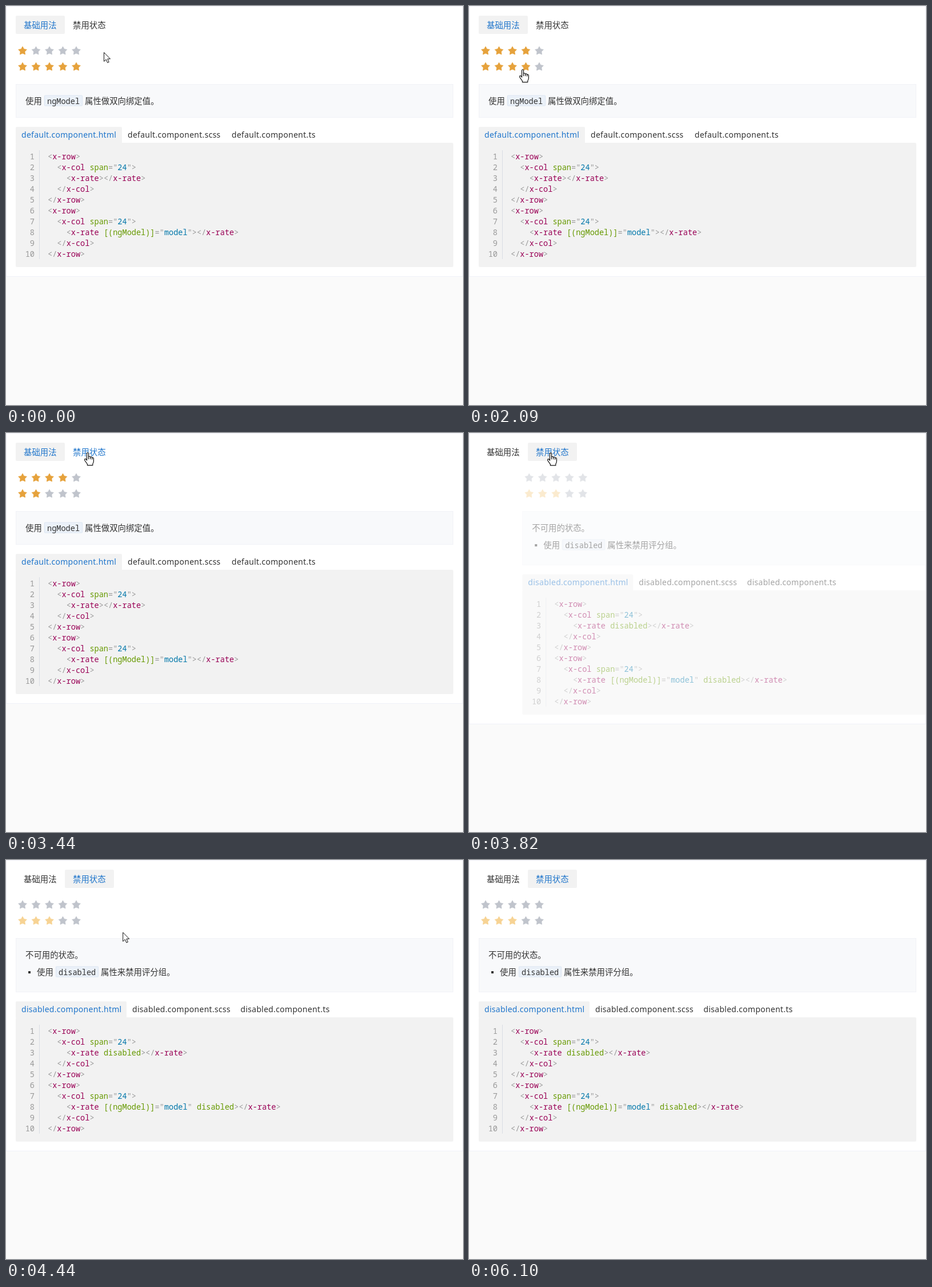
Animation, 800 px wide and 700 px high, one loop 6630 ms. Source, as an HTML page:

```html
<!DOCTYPE html>
<html lang="zh">
<head>
<meta charset="utf-8">
<title>Rate</title>
<style>
html, body { margin: 0; width: 100%; height: 100%; overflow: hidden; background: #fafafa; }
svg { display: block; width: 800px; height: 700px; }
text { white-space: pre; fill: #333; }
.ui { font: 14.4px "Noto Sans CJK SC", "Noto Sans CJK", "Noto Sans", sans-serif; }
.file { font: 14px "Noto Sans", sans-serif; letter-spacing: .28px; }
.code { font: 13.6px "Noto Sans Mono", monospace; }
.on { fill: #1f75cb; }
.num, .punct { fill: #999; }
.tag { fill: #905; }
.attr { fill: #690; }
.str { fill: #07a; }
</style>
</head>
<body>
<svg id="stage" viewBox="0 0 800 700"></svg>
<script>
const LOOP = 6630, SWITCH = 3560;
const OFF = '#c0c4cc', ON = '#e6a23c', DIM = '#f7d394';
const stage = document.getElementById('stage');
const esc = s => s.replace(/</g, '&lt;').replace(/>/g, '&gt;');
const rect = (x, y, w, h, fill, more = '') =>
  `<rect x="${x}" y="${y}" width="${w}" height="${h}" fill="${fill}" ${more}/>`;
const text = (x, y, cls, s, more = '') =>
  `<text x="${x}" y="${y}" class="${cls}" ${more}>${s}</text>`;

function star(cx, cy) {
  const pts = [];
  for (let i = 0; i < 10; i++) {
    const r = i % 2 ? 4.1 : 7.7, a = (i * 36 - 90) * Math.PI / 180;
    pts.push((cx + r * Math.cos(a)).toFixed(2) + ',' + (cy + r * Math.sin(a)).toFixed(2));
  }
  return `<polygon class="star" points="${pts.join(' ')}" stroke-linejoin="round" stroke-width=".8"/>`;
}

function stars() {
  let out = '';
  for (const y of [78.8, 106.8])
    for (let i = 0; i < 5; i++) out += star(29 + 23.5 * i, y);
  return out;
}

// Colours one line of markup.
function paint(line) {
  const span = (cls, s) => `<tspan class="${cls}">${esc(s)}</tspan>`;
  return line.replace(/(<\/?)([\w-]+)|(=")(\w+)(")|([\w[\]()]+)|(>+)/g,
    (m, open, tag, eq, val, end, attr) =>
      open ? span('punct', open) + span('tag', tag) :
      eq ? span('punct', eq) + span('str', val) + span('punct', end) :
      span(attr ? 'attr' : 'punct', m));
}

function codeBlock(y, name, tabs, first, second) {
  const row = inner => ['<x-row>', '  <x-col span="24">',
    `    <x-rate${inner}></x-rate>`, '  </x-col>', '</x-row>'];
  let out = rect(17, y, tabs[0] - 17, 30, '#f2f2f2', 'rx="2"') +
    rect(17, y + 28, 766, 218, '#f2f2f2', 'rx="2"') +
    rect(58, y + 41, 1, 191, '#d9dde3');
  ['html', 'scss', 'ts'].forEach((ext, i) => {
    const x = i ? tabs[i] : 27;
    out += text(x, y + 19, i ? 'file' : 'file on', `${name}.component.${ext}`);
  });
  [...row(first), ...row(second)].forEach((line, i) => {
    const by = y + 56.5 + 19 * i;
    out += text(50, by, 'code num', i + 1, 'text-anchor="end"') + text(73, by, 'code', paint(line));
  });
  return out;
}

const panel = h => rect(17.5, 137.5, 765, h, '#f8f9fb', 'stroke="#f1f2f7"');
const chip = (x, y, w, s) =>
  rect(x + .5, y - 14.5, w, 18, '#ebf1f9', 'stroke="#dbe5f1" rx="1"') + text(x + 5, y, 'code', s);

const basic = stars() + panel(58) +
  text(34, 171.5, 'ui', '使用') + chip(67, 171.5, 66, 'ngModel') +
  text(138, 171.5, 'ui', '属性做双向绑定值。') +
  codeBlock(212, 'default', [203, 213, 395], '', ' [(ngModel)]="model"');

const disabled = stars() + panel(94) +
  text(34, 171.5, 'ui', '不可用的状态。') + rect(39, 195, 4, 4, '#333') +
  text(54, 201.5, 'ui', '使用') + chip(87, 201.5, 74, 'disabled') +
  text(166, 201.5, 'ui', '属性来禁用评分组。') +
  codeBlock(248, 'disabled', [211, 221, 410.5], ' disabled', ' [(ngModel)]="model" disabled');

const cursors = `<g id="cursor" fill="#fff" stroke="#111" stroke-linejoin="round">
  <path id="arrow" d="M.5 .5V16.2L4.2 12.8 6.7 18.5 9.2 17.4 6.8 11.8H11.5Z"/>
  <path id="hand" stroke-width="1.2" d="M-1.5 14V2Q-1.3 .5 0 .5T1.5 2V8Q1.8 6.8 3.2 7T4.6 8.6Q5 7.6 6.3 7.9T7.6 9.5Q8.2 8.8 9.3 9.2T10.4 11V15.5Q10.3 18 8.8 20V22.6H-.6V20.5L-4.8 14.6Q-6 12.7-5 11.6-3.8 10.7-2.5 12.3ZM1.5 8V12M4.6 9V12M7.6 10V12.5"/>
  <g id="sign" stroke="#d9000d" stroke-width="2.4"><circle r="6.8"/><path d="M-4.8-4.8 4.8 4.8"/></g>
</g>`;

stage.innerHTML = `<rect id="card" x=".5" y=".5" width="799" fill="#fff" stroke="#f0f1f8"/>` +
  rect(17, 17, 86, 32, '#f2f2f2', 'id="tabBg" rx="2"') +
  text(31, 38.5, 'ui', '基础用法', 'id="tab1"') + text(117, 38.5, 'ui', '禁用状态', 'id="tab2"') +
  `<g id="basic">${basic}</g><g id="disabled">${disabled}</g>` + cursors;

const $ = id => document.getElementById(id);
const el = {};
for (const id of ['card', 'tabBg', 'tab1', 'tab2', 'basic', 'disabled', 'cursor', 'arrow', 'hand', 'sign'])
  el[id] = $(id);
const basicStars = [...el.basic.querySelectorAll('.star')];

function fillStars(list, first, second, colour) {
  list.forEach((s, i) => {
    const c = i % 5 < (i < 5 ? first : second) ? colour : OFF;
    s.setAttribute('fill', c);
    s.setAttribute('stroke', c);
  });
}
fillStars([...el.disabled.querySelectorAll('.star')], 0, 3, DIM);

// Pointer path: time, x, y
const path = [
  [0, 171, 81], [69, 171, 81], [70, 169, 81], [240, 169, 82], [700, 82, 84], [870, 77, 83],
  [930, 77, 83], [1180, 98, 80], [1220, 98, 80], [1560, 99, 82], [1640, 99, 82], [1900, 98, 101],
  [2080, 94, 111], [2180, 94, 111], [2260, 64, 107], [2340, 64, 107], [2500, 43, 105],
  [2640, 43, 105], [2730, 48, 104], [2870, 48, 104], [3300, 143, 34], [3440, 143, 34],
  [4050, 143, 34.5], [4220, 160, 42], [4450, 206, 130], [4600, 150, 95], [4760, 57, 81],
  [4970, 57, 81], [5130, 96, 111], [5350, 96, 111], [6000, 734, 696]
];
// Ratings: time, value
const rateA = [[0, 1], [447, 5], [550, 4], [670, 3], [1270, 4]];
const rateB = [[0, 5], [1900, 4], [2350, 3], [2430, 2]];

const clamp = v => Math.max(0, Math.min(1, v));
const easeInOut = p => p < .5 ? 4 * p ** 3 : 1 - 4 * (1 - p) ** 3;
const valueAt = (steps, t) => steps.filter(s => s[0] <= t).pop()[1];

function pointer(t) {
  const i = path.findIndex(p => p[0] > t);
  if (i < 0) return path[path.length - 1].slice(1);
  const [t0, x0, y0] = path[i - 1], [t1, x1, y1] = path[i], k = (t - t0) / (t1 - t0);
  return [x0 + (x1 - x0) * k, y0 + (y1 - y0) * k];
}

function draw(t) {
  const second = t >= SWITCH, [x, y] = pointer(t);
  const overTab = x > 103 && x < 189 && y > 17 && y < 49;
  const overStars = x > 18 && x < 133 && y > 68 && y < 120;

  el.card.setAttribute('height', second ? 510 : 474);
  el.tabBg.setAttribute('x', second ? 103 : 17);
  el.tab1.setAttribute('class', second ? 'ui' : 'ui on');
  el.tab2.setAttribute('class', second || overTab ? 'ui on' : 'ui');

  const out = clamp((t - 3470) / 120), p = easeInOut(clamp((t - 3590) / 630));
  el.basic.setAttribute('opacity', 1 - out);
  el.disabled.setAttribute('opacity', Math.sqrt(p));
  el.disabled.setAttribute('transform', `translate(${95 * (1 - p)} 0)`);
  fillStars(basicStars, valueAt(rateA, t), valueAt(rateB, t), ON);

  const kind = overStars ? (second ? 'sign' : 'hand') : overTab ? 'hand' : 'arrow';
  for (const k of ['arrow', 'hand', 'sign'])
    el[k].setAttribute('visibility', k === kind && t < 6100 ? 'visible' : 'hidden');
  el.cursor.setAttribute('transform', `translate(${x} ${y})`);
}

const start = performance.now();
function tick() {
  draw((performance.now() - start) % LOOP);
  requestAnimationFrame(tick);
}
tick();
</script>
</body>
</html>
```
